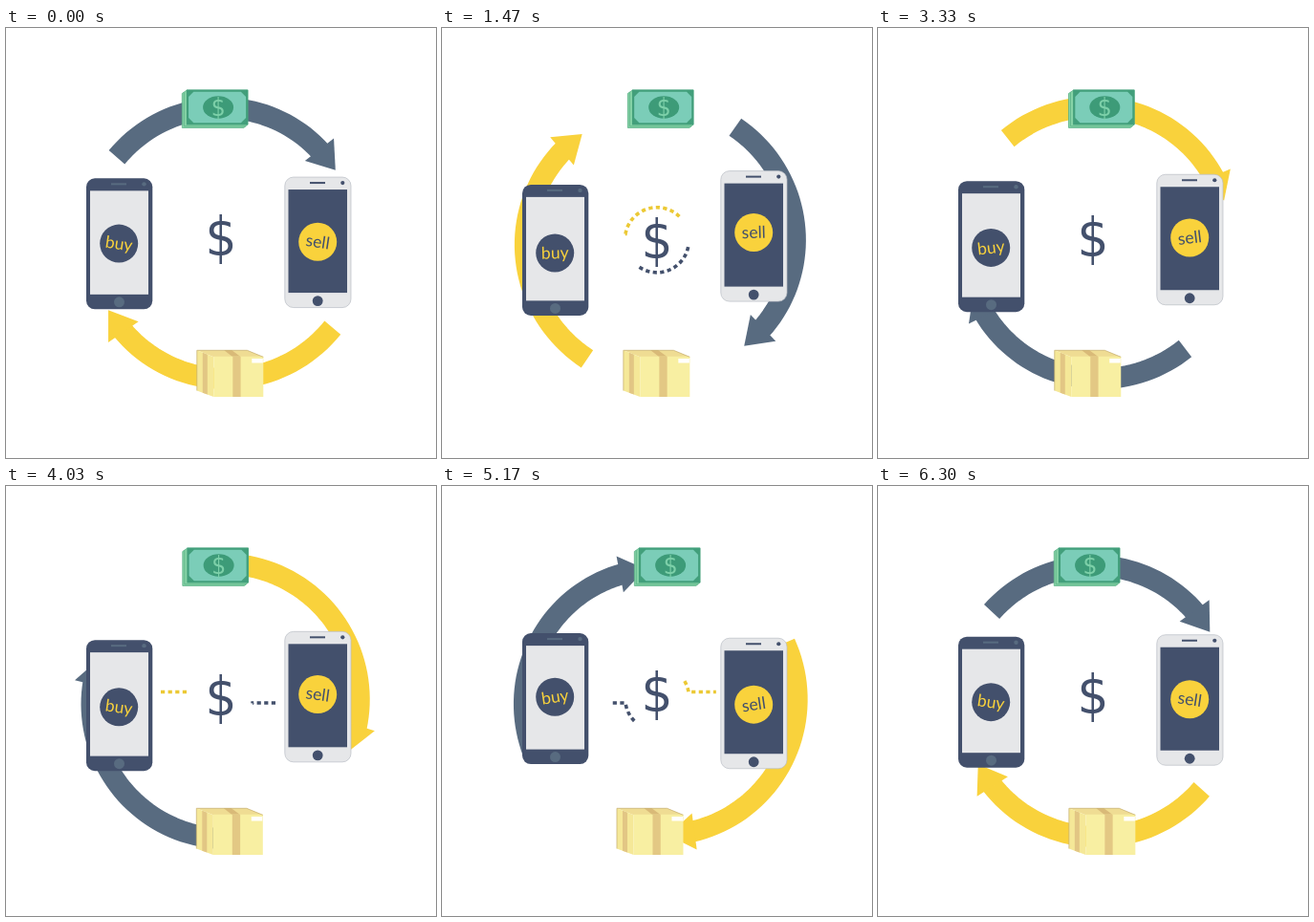
Animation of 450 by 450 pixels, one loop 6330 ms. Source, as an HTML page:

```html
<!DOCTYPE html>
<html lang="en">
<head>
<meta charset="utf-8">
<title>Buy and sell</title>
<style>
  html, body { margin: 0; width: 100%; height: 100%; overflow: hidden; background: #fff; }
  svg { display: block; width: 100vw; height: 100vh; }
  text { text-anchor: middle; }
  .label { font: 17.5px Lato, "Open Sans", sans-serif; }
  .sign { font-family: "DejaVu Sans", sans-serif; font-stretch: semi-condensed; }
</style>
</head>
<body>
<svg viewBox="0 0 450 450">
  <g id="arrows" stroke-width="22" fill="none">
    <g stroke="#586b80"><path id="slateBand"/><path id="slateHead" fill="#586b80" stroke="none"/></g>
    <g stroke="#f9d23c"><path id="goldBand"/><path id="goldHead" fill="#f9d23c" stroke="none"/></g>
  </g>

  <g fill="none" stroke-width="3.6">
    <path id="goldDots" stroke="#ecc935" d="M162 215.5H192A33.5 33.5 0 0 1 258 215.5H288"/>
    <path id="slateDots" stroke="#43506c" d="M282 227H258A33.3 33.3 0 0 1 192 227H176"/>
  </g>
  <text id="dollar" class="sign" x="225" y="237.6" font-size="57.5" fill="#43506c">$</text>

  <g id="buyPhone">
    <rect x="84" y="0" width="69.3" height="137" rx="9" fill="#43506c"/>
    <rect x="88" y="13" width="61" height="108.5" fill="#e6e7e9"/>
    <path d="M110 6H126" stroke="#586b80" stroke-width="2"/>
    <circle cx="144.5" cy="6" r="2.2" fill="#586b80"/>
    <circle cx="118.5" cy="129.5" r="5.5" fill="#586b80"/>
  </g>
  <g id="buyBadge">
    <circle r="20" fill="#43506c"/>
    <text class="label" id="buyText" y="6" fill="#f9d23c">buy</text>
  </g>

  <g id="sellPhone">
    <rect x="291.8" y="0" width="69.2" height="136.5" rx="9" fill="#e6e7e9" stroke="#b9bdc5" stroke-width=".7"/>
    <rect x="295.5" y="13" width="61.5" height="108" fill="#43506c"/>
    <path d="M318 6H334" stroke="#43506c" stroke-width="2"/>
    <circle cx="352.3" cy="6" r="2.1" fill="#43506c"/>
    <circle cx="326.2" cy="129.5" r="5.4" fill="#43506c"/>
  </g>
  <g id="sellBadge">
    <circle r="20" fill="#f9d23c"/>
    <text class="label" id="sellText" y="6" fill="#43506c">sell</text>
  </g>

  <g id="money">
    <g fill="#86d3a6" stroke="#5bb287" stroke-width=".8">
      <path d="M.4 68.5L5.5 65H69V101L65 104.4H.4Z"/>
      <path d="M2.4 67.3V102.8H67" fill="none"/>
    </g>
    <rect x="5" y="64.6" width="64.4" height="36.8" fill="#429f7b"/>
    <path d="M12.4 66.8H62L67.2 72V94L62 99.2H12.4L7.2 94V72Z" fill="#7bcdb8"/>
    <ellipse cx="38.2" cy="83" rx="16" ry="11.8" fill="#3d9b78"/>
    <text class="sign" x="38.2" y="91.7" font-size="26" fill="#7dd0a9">$</text>
  </g>

  <g id="box">
    <path d="M0 337.3H52.5L69.5 344.3H17.5Z" fill="#efdc93"/>
    <path d="M28.5 337.3H36.5L46 344.3H37.5Z" fill="#d9ba78"/>
    <path d="M0 337.3L17.5 344.3V386L0 379.5Z" fill="#f5e898"/>
    <path d="M6 339.7L11 341.7V383.6L6 381.7Z" fill="#e2c684"/>
    <path d="M17.5 343.8H69.5V386H17.5Z" fill="#f8efa2"/>
    <path d="M37.5 343.8H45.8V386H37.5Z" fill="#e3c884"/>
    <path d="M57.5 346H69V350.5H57.5Z" fill="#fff"/>
    <path d="M0 379.5V337.3H52.5L69.5 344.3" fill="none" stroke="#c4ac6c" stroke-width=".7"/>
  </g>
</svg>
<script>
const LOOP = 6330;
const CENTER = { x: 228.8, y: 225 };
const TURN_RATE = 57.45;      // degrees per second
const SWING_PERIOD = 2105;
const DOT_PERIOD = 3150;
const DASH = 4.2, GAP = 3.4;

const el = id => document.getElementById(id);
const move = (id, x, y) => el(id).setAttribute("transform", `translate(${x} ${y})`);
const clamp01 = x => Math.min(1, Math.max(0, x));
const easeSine = x => (1 - Math.cos(Math.PI * clamp01(x))) / 2;

function polar(radius, degrees) {
  const a = degrees * Math.PI / 180;
  return `${(CENTER.x + radius * Math.cos(a)).toFixed(2)} ${(CENTER.y + radius * Math.sin(a)).toFixed(2)}`;
}

// The band tightens slightly from tail to head.
function buildArrow(name, start, sweep, tailRadius, headRadius) {
  const points = [], steps = 40, bandSweep = sweep - 10.2;
  for (let i = 0; i <= steps; i++) {
    const u = i / steps;
    points.push(polar(tailRadius + (headRadius - tailRadius) * u, start + bandSweep * u));
  }
  el(name + "Band").setAttribute("d", "M" + points.join("L"));
  const end = start + sweep;
  const head = [polar(headRadius, end), polar(headRadius + 19.5, end - 10.5), polar(headRadius - 18.5, end - 12.4)];
  el(name + "Head").setAttribute("d", "M" + head.join("L") + "Z");
}

function trimDots(id, from, to) {
  const path = el(id), total = path.getTotalLength();
  const tail = from * total, head = to * total;
  const visible = head - tail > GAP;
  path.style.display = visible ? "" : "none";
  if (!visible) return;
  const pattern = [0, tail];
  for (let s = tail; s < head; s += DASH + GAP) pattern.push(Math.min(DASH, head - s), GAP);
  pattern.push(0, 999);
  path.setAttribute("stroke-dasharray", pattern.join(" "));
}

// Thirty pictures per second, on a 10 ms clock.
function snap(ms) {
  const rest = ms % 100;
  const step = rest >= 70 ? 2 : rest >= 30 ? 1 : 0;
  return (Math.floor(ms / 100) * 3 + step) * 100 / 3;
}

function draw(ms) {
  const t = snap(ms % LOOP);
  const phase = 2 * Math.PI * t / SWING_PERIOD;
  const bob = -Math.sin(phase - 0.07);
  const sway = -Math.cos(phase + 0.15);

  el("arrows").setAttribute("transform", `rotate(${TURN_RATE * t / 1000} ${CENTER.x} ${CENTER.y})`);

  move("buyPhone", 0, 156.8 + 7.7 * bob);
  move("sellPhone", 0, 156.6 - 7.6 * bob);
  move("buyBadge", 118.2, 224.8 + 11.6 * bob);
  move("sellBadge", 326.2, 224.6 - 11.6 * bob);
  for (const id of ["buyText", "sellText"]) el(id).setAttribute("transform", `rotate(${-8.6 * sway})`);
  move("dollar", 0, 3.8 * bob);

  move("money", 192.4 + 8.6 * sway, 0);
  move("box", 191.4 - 8.5 * sway, 0);

  const s = t % DOT_PERIOD / 1000;
  const head = easeSine((s - 0.4) / 1.73);
  const tail = easeSine((s - 1.02) / 1.54);
  trimDots("goldDots", tail, head);
  trimDots("slateDots", tail, head);
}

buildArrow("slate", 218.5, 108.2, 144.2, 138.8);
buildArrow("gold", 38.1, 111.9, 143.6, 140.6);

const begin = performance.now();
function tick() {
  draw(performance.now() - begin);
  requestAnimationFrame(tick);
}
tick();
</script>
</body>
</html>
```
